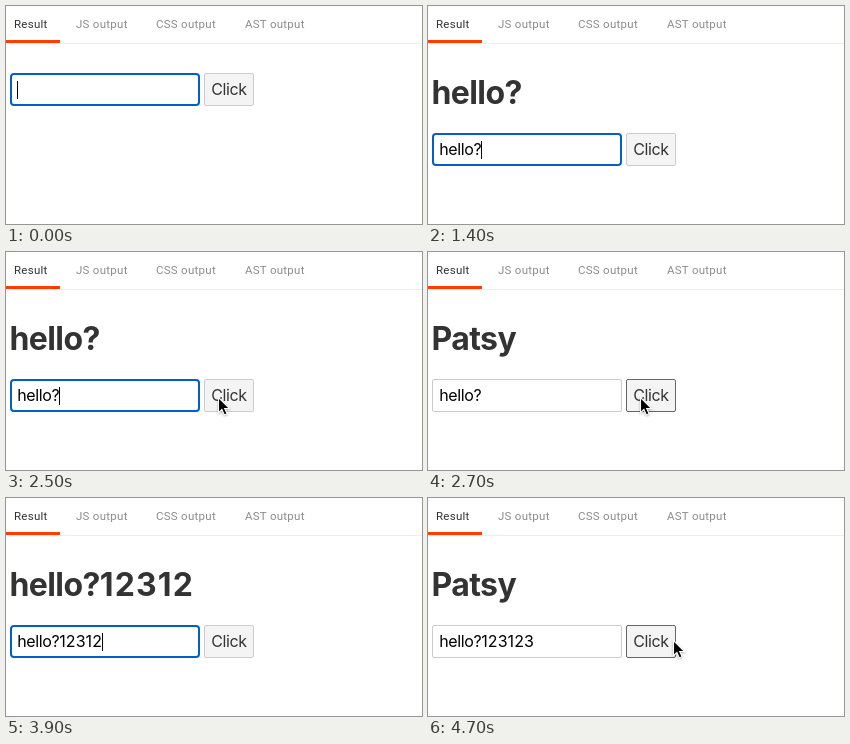
An HTML page for the animation above (5.1 s loop, 416 by 218 pixels).

```html
<!DOCTYPE html>
<html lang="en">
<head>
<meta charset="utf-8">
<title>Input and button</title>
<style>
html, body { margin: 0; width: 100%; height: 100%; overflow: hidden; background: #fff; }
#stage { position: relative; width: 416px; height: 218px; overflow: hidden; }
#stage * { position: absolute; box-sizing: border-box; white-space: pre; }
nav { left: 0; top: 0; width: 416px; height: 38px; border-bottom: 1px solid #eee; }
nav span { top: 10px; font: 400 11.5px/16px Roboto, sans-serif; letter-spacing: .27px; color: #8c8c8c; }
nav span.on { color: #333; }
nav i { left: 0; top: 34px; width: 54px; height: 3px; background: #ff3e00; }
h1 { left: 3.5px; top: 67px; margin: 0; font: 700 32px/40px Inter, sans-serif; letter-spacing: -.6px; color: #333; }
#row { left: 0; width: 416px; height: 33px; }
#field, #button { top: 0; height: 33px; border: 1px solid #ccc; border-radius: 2px; }
#field { left: 4px; width: 190px; background: #fff; }
#field.focus { border: 2px solid #0060c7; border-radius: 4px; }
#button { left: 198px; width: 50px; background: #f4f4f4; }
#button.focus { border-color: #666; }
#button.down { background: #ddd; }
.text { top: 6px; font: 400 16px/20px Inter, sans-serif; letter-spacing: -.4px; }
#value { left: 11.3px; color: #000; }
#label { left: 205.3px; color: #333; }
#stage .run, #stage .run span { position: static; }
.run .digits { letter-spacing: .035em; }
.text .digits { letter-spacing: .005em; }
#caret { left: 100%; top: 2px; width: 1px; height: 18px; background: #000; }
svg { left: 0; top: 0; overflow: visible; }
#arrow { filter: drop-shadow(0 1px 1px rgba(0,0,0,.3)); }
</style>
</head>
<body>
<div id="stage">
  <nav>
    <span class="on" style="left:8px">Result</span>
    <span style="left:70px">JS output</span>
    <span style="left:150px">CSS output</span>
    <span style="left:239px">AST output</span>
    <i></i>
  </nav>
  <h1><span id="title" class="run"><span></span><span class="digits"></span></span></h1>
  <div id="row">
    <div id="field"></div>
    <div id="value" class="text"><span id="typed" class="run"><span></span><span class="digits"></span></span><b id="caret"></b></div>
    <div id="button"></div>
    <div id="label" class="text">Click</div>
  </div>
  <svg id="arrow" width="14" height="20">
    <path d="M0 0V15.2L3.4 12L5.8 17.4L8.6 16.2L6.2 11H11Z" fill="#000" stroke="#fff" stroke-width="1.1"/>
  </svg>
  <svg id="beam" width="8" height="17">
    <g fill="none">
      <path d="M-3.5 -8Q0 -8 0 -5.5Q0 -8 3.5 -8M0 -6V6M-3.5 8Q0 8 0 5.5Q0 8 3.5 8M-2 1.5H2" stroke="#fff" stroke-width="2.4"/>
      <path d="M-3.5 -8Q0 -8 0 -5.5Q0 -8 3.5 -8M0 -6V6M-3.5 8Q0 8 0 5.5Q0 8 3.5 8M-2 1.5H2" stroke="#111" stroke-width="1.1"/>
    </g>
  </svg>
</div>
<script>
const LOOP = 5100, STEP = 100, NAME = 'Patsy';
const $ = id => document.getElementById(id);

// [time, value]: each value holds until the next entry
const typing = [[0, ''], [200, 'h'], [300, 'he'], [500, 'hel'], [600, 'hell'], [800, 'hello'],
  [1400, 'hello?'], [3600, 'hello?1'], [3700, 'hello?123'], [3900, 'hello?12312'], [4000, 'hello?123123']];
const focus = [[0, 'field'], [2600, 'button'], [3500, 'field'], [4600, 'button']];
const named = [[0, false], [2700, true], [3600, false], [4700, true]];
const pressed = [[0, false], [2600, true], [2700, false], [4600, true], [4700, false]];
const caretOn = [[0, true], [1300, false], [1400, true], [1900, false], [2400, true],
  [2600, false], [3500, true], [4500, false]];

// [time, x, y]: the pointer glides between points, hidden outside each path
const paths = [
  { end: 3600, points: [[1900, 20, 122], [2000, 128, 100], [2100, 217, 88], [2200, 216, 110],
    [2400, 214, 143], [2500, 212.5, 145.5], [3000, 212.5, 145.5], [3200, 196, 145], [3400, 164.5, 143]] },
  { end: LOOP, points: [[4100, 166, 143], [4200, 180, 143], [4300, 207, 144],
    [4400, 229, 144], [4500, 244.5, 143], [4600, 245.5, 142.5]] }
];

const at = (track, t) => track.filter(k => k[0] <= t).pop()[1];

function pointer(t) {
  const path = paths.find(p => t >= p.points[0][0] && t < p.end);
  if (!path) return null;
  const pts = path.points;
  const i = pts.findIndex(p => p[0] > t);
  if (i < 0) return pts[pts.length - 1].slice(1);
  const a = pts[i - 1], b = pts[i], k = (t - a[0]) / (b[0] - a[0]);
  return [a[1] + (b[1] - a[1]) * k, a[2] + (b[2] - a[2]) * k];
}

// Letters and digits are tracked differently
function write(el, text) {
  const word = text.replace(/\d/g, '');
  el.children[0].textContent = word;
  el.children[1].textContent = text.slice(word.length);
}

function place(el, pos, shown) {
  el.style.display = shown ? 'block' : 'none';
  if (shown) el.style.transform = `translate(${pos[0]}px, ${pos[1]}px)`;
}

function draw(t) {
  const value = at(typing, t), target = at(focus, t);
  write($('title'), at(named, t) ? NAME : value);
  write($('typed'), value);
  $('row').style.top = value ? '127px' : '67px';
  $('field').className = target === 'field' ? 'focus' : '';
  $('button').className = (target === 'button' ? 'focus ' : '') + (at(pressed, t) ? 'down' : '');
  $('caret').style.display = at(caretOn, t) ? 'block' : 'none';
  const pos = pointer(t);
  const overField = pos && pos[0] > 4 && pos[0] < 194 && pos[1] > 127 && pos[1] < 160;
  place($('arrow'), pos, pos && !overField);
  place($('beam'), pos, overField);
}

const start = performance.now();
function tick() {
  const t = Math.max(0, performance.now() - start) % LOOP;
  draw(Math.floor(t / STEP) * STEP);
  requestAnimationFrame(tick);
}
draw(0);
requestAnimationFrame(tick);
</script>
</body>
</html>
```
